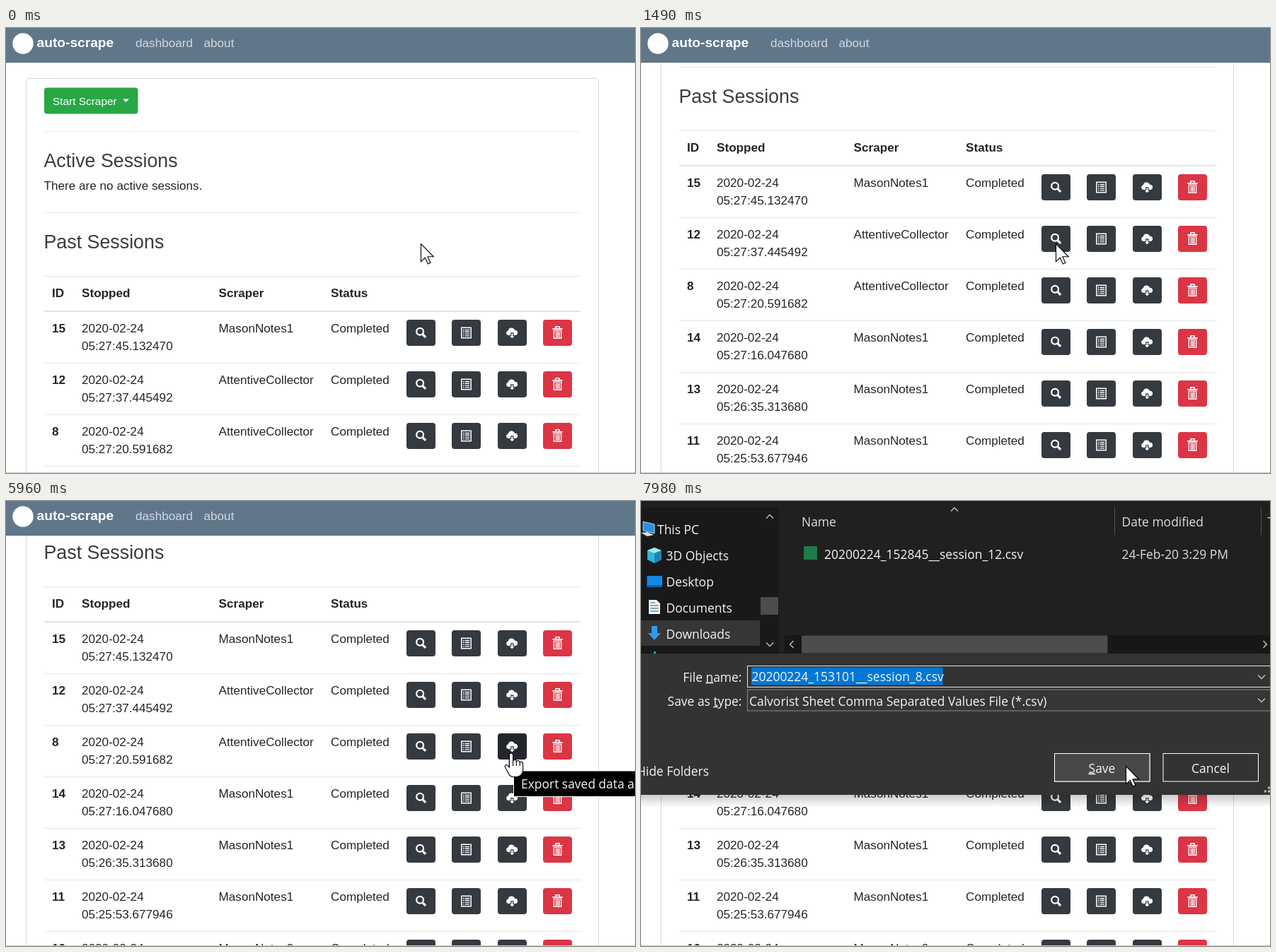
Recreate the animation shown at these times as an HTML page. Size 889 px wide and 630 px high, loop 8000 ms.

```html
<!DOCTYPE html>
<html lang="en">
<head>
<meta charset="utf-8">
<title>Session list</title>
<style>
html, body { margin: 0; width: 100%; height: 100%; overflow: hidden; background: #fff; }
svg { display: block; width: 889px; height: 630px; }
text { font: 17.15px "Liberation Sans", Arial, sans-serif; fill: #212529; white-space: pre; }
.b { font-weight: 700; }
.h { font-size: 26.8px; fill: #3a3d40; }
.brand { font-size: 19.2px; font-weight: 700; fill: #fff; }
.link { fill: #d0d8de; }
.btn { font-size: 15.4px; fill: #fff; }
.ui { font: 17.45px "Open Sans", "Noto Sans", sans-serif; fill: #f4f4f4; }
.dim { fill: #dcdcdc; }
.end { text-anchor: end; }
.mid { text-anchor: middle; }
.u { text-decoration: underline; }
</style>
</head>
<body>
<svg id="stage" viewBox="0 0 889 630"></svg>
<script>
const LOOP = 8000, ROW = 73, COLS = [566, 630, 695, 759];

const text = (x, y, s, c = '') => `<text x="${x}" y="${y}" class="${c}">${s}</text>`;
const rect = (x, y, w, h, fill, more = '') =>
  `<rect x="${x}" y="${y}" width="${w}" height="${h}" fill="${fill}" ${more}/>`;
const path = (d, stroke, w = 1, fill = 'none') =>
  `<path d="${d}" fill="${fill}" stroke="${stroke}" stroke-width="${w}"/>`;
const rule = (y, color = '#e3e6e9', h = 1) => rect(54, y, 758, h, color);
// Shown only while from <= time < to
const during = (from, to, s) => `<g data-from="${from}" data-to="${to}">${s}</g>`;

// Button icons, drawn around their centre
const icons = [
  '<circle cx="-1.4" cy="-1.8" r="4.9" fill="none" stroke="#fff" stroke-width="2.3"/>' +
    path('M2.3 2.1L6.6 6.4', '#fff', 3.2),
  path('M-6.7-7.2H6.7V7.2H-6.7Z', '#fff', 1.5) +
    path('M-4.6-4H-3M-1.8-4H4.6M-4.6-1.2H-3M-1.8-1.2H4.6M-4.6 1.6H-3M-1.8 1.6H4.6M-4.6 4.4H-3M-1.8 4.4H4.6', '#fff', 1.4),
  path('M-5.2 3.5A3.3 3.3 0 0 1-5.8-3Q-4.8-7.4-.8-7Q2.4-6.8 3.4-3.8A3.7 3.7 0 0 1 4.6 3.5Z', 'none', 0, '#fff') +
    path('M-1.8 .4H1.4V4H4.4L-.2 9-4.8 4H-1.8Z', '#30363c', 1.2, '#fff'),
  path('M-7.2-5.6H7.2M-2.6-6V-8.8H2.6V-6', '#fff', 1.6) +
    path('M-5.2-3.4H5.2V7.8H-5.2ZM-2-2V6.5M.2-2V6.5M2.4-2V6.5', '#fff', 1.4)
];

function row([id, time, name], i) {
  const y = 401 + ROW * i;
  const buttons = COLS.map((x, k) =>
    rect(x, y + 12, 41, 37, k < 3 ? '#343a40' : '#dc3545', `rx="4" data-btn="${i},${k}"`) +
    `<g transform="translate(${x + 20.5} ${y + 30.5})">${icons[k]}</g>`).join('');
  return text(65, y + 30, id, 'b') + text(107, y + 30, '2020-02-24') + text(107, y + 55, time) +
    text(300.5, y + 30, name) + text(459, y + 30, 'Completed') + buttons + rule(y + ROW);
}

const rows = [
  [15, '05:27:45.132470', 'MasonNotes1'],
  [12, '05:27:37.445492', 'AttentiveCollector'],
  [8, '05:27:20.591682', 'AttentiveCollector'],
  [14, '05:27:16.047680', 'MasonNotes1'],
  [13, '05:26:35.313680', 'MasonNotes1'],
  [11, '05:25:53.677946', 'MasonNotes1'],
  [10, '05:25:20.310528', 'MasonNotes2']
];

const page = rect(28.5, 71.5, 809, 900, '#fff', 'rx="4" stroke="#d6d6d6"') +
  rect(54, 84.5, 132.5, 37, '#28a745', 'rx="4"') + text(66, 108.5, 'Start Scraper', 'btn') +
  path('M165 100.5H174L169.5 105Z', 'none', 0, '#fff') +
  rule(146, '#ececec') + text(53.5, 196.5, 'Active Sessions', 'h') +
  text(53.5, 229, 'There are no active sessions.') +
  rule(261, '#e6e6e6') + text(53.5, 311.5, 'Past Sessions', 'h') + rule(351) +
  text(65, 381, 'ID', 'b') + text(107, 381, 'Stopped', 'b') +
  text(300.5, 381, 'Scraper', 'b') + text(459, 381, 'Status', 'b') +
  rule(400, '#dee2e6', 2) + rows.map(row).join('');

const navbar = rect(0, 0, 889, 49, '#60778a') + rect(0, 48, 889, 1, '#546a7c') +
  '<circle cx="24" cy="22" r="14.7" fill="#fff"/>' +
  text(43.5, 27, 'auto-scrape', 'brand') + text(183, 27, 'dashboard', 'link') + text(279.5, 27, 'about', 'link');

const tip = (x, y, w, s) =>
  rect(x + .5, y + .5, w - 1, 36.5, '#000', 'stroke="#fff"') + text(x + 11, y + 25.5, s, 'ui');

const tips = during(2590, 3390, tip(606, 383, 158, 'View session log')) +
  during(4050, 4850, tip(657, 373, 172, 'View scraped data')) +
  during(5960, 6760, tip(717, 381.5, 240, 'Export saved data as CSV'));

// Save dialog
const monitor = y => path(`M3 ${y - 11}L19 ${y - 7}V${y + 6}L3 ${y + 2}Z`, '#9fd4f5', 1, '#2c8fe0') +
  path(`M0 ${y + 5}L9 ${y + 4}L18 ${y + 8}L9 ${y + 10}Z`, 'none', 0, '#d5dde3');
const chevron = (x, y, d) => path({
  up: `M${x - 5} ${y + 2.5}l5-5 5 5`, down: `M${x - 5} ${y - 2.5}l5 5 5-5`,
  left: `M${x + 2.5} ${y - 5}l-5 5 5 5`, right: `M${x - 2.5} ${y - 5}l5 5-5 5`
}[d], '#c4c4c4', 1.4);

const quickNav = rect(0, 181, 168, 35, '#333') + rect(170, 36, 24, 116, '#5a5a5a') +
  ['Quick access', 'Stowbin', 'OwnShelf', 'This PC'].map((s, i) => text(24, 59 + 49 * i, s, 'ui')).join('') +
  monitor(199);

const pcNav = rect(0, 169, 168, 36, '#363636') + rect(169, 136, 25, 25, '#4d4d4d') +
  text(23, 46.5, 'This PC', 'ui') +
  ['3D Objects', 'Desktop', 'Documents', 'Downloads'].map((s, i) => text(35.5, 83.5 + 37 * i, s, 'ui')).join('') +
  monitor(40) +
  path('M19 66L29 70V83L19 88L9 83V70Z', 'none', 0, '#35b4d6') +
  path('M19 66L29 70L19 74L9 70Z', 'none', 0, '#a5e6f3') + path('M19 74L29 70V83L19 88Z', 'none', 0, '#1d86b5') +
  rect(8.5, 106, 21.5, 16, '#1487e0') + rect(8.5, 119, 21.5, 3, '#0a62b0') +
  path('M11 140H22L27 145V160H11Z', 'none', 0, '#f2f4f5') +
  path('M13.5 144H20M13.5 148H24.5M13.5 152H24.5M13.5 156H24.5', '#5f8fae', 1.3) +
  path('M15 177H23V187H28L19 197L10 187H15Z', 'none', 0, '#2e9bee') + rect(18, 213, 3, 3, '#1fa3c8');

const saveBox = fill => rect(584.5, 357.5, 134.5, 39.5, fill, 'stroke="#fff"');

const form = rect(0, 216, 889, 200, '#333') +
  text(142.5, 255.5, 'File <tspan class="u">n</tspan>ame:', 'ui end') +
  text(142.5, 289.5, 'Save as <tspan class="u">t</tspan>ype:', 'ui end') +
  rect(150.5, 233.5, 760, 30, '#333', 'stroke="#e8e8e8"') + rect(156, 235.5, 270.5, 25, '#0078d7') +
  text(156.5, 255, '20200224_153101__session_8.csv', 'ui') +
  rect(150.5, 267, 760, 30, '#363636', 'stroke="#8a8a8a"') +
  text(153, 289.5, 'Calvorist Sheet Comma Separated Values File (*.csv)', 'ui') +
  chevron(877, 249, 'down') + chevron(877, 282, 'down') +
  text(96, 388.5, 'Hide Folders', 'ui end') +
  saveBox('#333') + during(7850, LOOP, saveBox('#484848')) +
  rect(738, 357.5, 134.5, 39.5, '#333', 'stroke="#fff"') +
  text(651.5, 384.5, '<tspan class="u">S</tspan>ave', 'ui mid') + text(805, 384.5, 'Cancel', 'ui mid') +
  path('M886 406h3M881 411h3M886 411h3', '#bbb', 3);

const unpainted = rect(0, 364, 100, 32, '#fff') + rect(583.5, 356.5, 135.5, 40, '#fff') +
  rect(737, 356.5, 134.5, 40, '#fff') + rect(870, 389, 19, 26, '#fff');

const dialog = rect(0, 416, 889, 18, 'url(#shade)') + rect(0, 0, 889, 416, '#202020') +
  during(0, 7510, rect(0, 0, 889, 316, '#fff')) +
  rect(0, 9, 195, 207, '#191919') + rect(201, 9, 688, 207, '#202020') + rect(0, 316, 889, 100, '#333') +
  during(0, 7620, quickNav) + during(7620, LOOP, pcNav) +
  chevron(182, 22, 'up') + chevron(182, 203, 'down') +
  text(227, 36, 'Name', 'ui dim') + text(679.5, 36, 'Date modified', 'ui dim') + text(885.5, 36, 'Type', 'ui dim') +
  chevron(443, 12, 'up') + rect(669, 9, 1, 39, '#555') + rect(876, 9, 1, 39, '#555') +
  rect(203, 190, 686, 26, '#171717') + rect(227, 190.5, 432.5, 25, '#4d4d4d') +
  chevron(213, 203, 'left') + chevron(882, 203, 'right') +
  during(0, 7740, text(548.5, 91.5, 'Working on it...', 'ui mid')) +
  during(7740, LOOP, rect(230, 64, 19, 19, '#1d7c48') +
    text(259, 82, '20200224_152845__session_12.csv', 'ui') + text(679.5, 82, '24-Feb-20 3:29 PM', 'ui dim')) +
  during(0, 7510, unpainted) + during(7510, LOOP, form);

const arrow = path('M.5 .5V25.8L6.3 20.3L10.3 29L13.9 27.4L10 18.8H18.3Z', '#000', 1.1, '#fff');
const hand = path('M-2.6 3Q-2.6 .5 0 .5T2.6 3V12Q2.8 9.6 5 9.6T7.4 12.5V13.2Q7.6 11 9.8 11T12.2 14V14.8Q12.4 12.8 14.4 12.8T16.6 15.6V24Q16.4 33.5 7 34H3Q-2 34-4.5 28L-8.5 20.5Q-9.2 17.5-7 17Q-4.8 17-2.6 20.5Z', '#000', 1.1, '#fff') +
  path('M-2.6 20V3M2.6 11V18.5M7.4 12.5V18.5M12.2 14V18.5', '#000', 1.1);

const stage = document.getElementById('stage');
stage.innerHTML = '<defs><linearGradient id="shade" x2="0" y2="1"><stop stop-opacity=".2"/>' +
  '<stop offset="1" stop-opacity="0"/></linearGradient></defs>' +
  rect(0, 0, 889, 630, '#fff') + `<g id="page">${page}</g>` + navbar + rect(0, 629, 889, 1, '#c9cbcd') +
  `<g id="dialog">${dialog}</g>${tips}<g id="cursor"><g id="arrow">${arrow}</g><g id="hand">${hand}</g></g>`;

// Step tables: [time, value...], each held until the next
const scrollSteps = [0, 10, 36, 70, 103, 133, 158, 177, 190, 199, 206, 213, 220, 226, 230]
  .map((y, i) => [i ? 390 + i * 110 : 0, y]);
const cursorSteps = [
  [0, 586, 305], [1830, 586, 312], [1940, 586, 321], [2090, 586, 334], [2190, 586, 346],
  [2290, 587, 355], [2390, 587, 361], [2490, 587, 363.5],
  [3390, 598, 362], [3500, 613, 358], [3600, 628, 355], [3710, 639, 354],
  [4850, 646, 354], [4960, 661, 355], [5070, 677, 356], [5190, 692, 357], [5300, 706, 358], [5410, 718, 359],
  [5740, 716, 358], [5850, 714, 356.5], [6980, 715, 356],
  [7740, 711, 361], [7850, 697, 369], [7980, 685, 375]
];
const dialogSteps = [[0, 0], [7080, .45], [7190, .93], [7290, 1]];

const at = (steps, t) => steps.reduce((held, s) => s[0] <= t + .5 ? s : held);
const el = id => document.getElementById(id);
const [pageEl, dialogEl, cursorEl, arrowEl, handEl] = ['page', 'dialog', 'cursor', 'arrow', 'hand'].map(el);
const show = (e, on) => e.style.display = on ? '' : 'none';
const timed = [...stage.querySelectorAll('[data-from]')];
const buttons = [...stage.querySelectorAll('[data-btn]')].map(e => {
  const [i, k] = e.dataset.btn.split(',').map(Number);
  return { e, x: COLS[k], y: 413 + ROW * i, base: k < 3 ? '#343a40' : '#dc3545', lit: k < 3 ? '#23272b' : '#c82333' };
});

function draw(t) {
  const [, scroll] = at(scrollSteps, t), [, x, y] = at(cursorSteps, t), [, alpha] = at(dialogSteps, t);
  let over = false;
  for (const b of buttons) {
    const top = b.y - scroll;
    const hit = t >= 2090 && t < 6980 && x >= b.x && x <= b.x + 41 && y >= top && y <= top + 37;
    b.e.setAttribute('fill', hit ? b.lit : b.base);
    over = over || hit;
  }
  pageEl.setAttribute('transform', `translate(0 ${-scroll})`);
  cursorEl.setAttribute('transform', `translate(${x} ${y})`);
  show(arrowEl, !over);
  show(handEl, over);
  show(dialogEl, alpha > 0);
  dialogEl.setAttribute('opacity', alpha);
  for (const e of timed) show(e, t >= +e.dataset.from && t < +e.dataset.to);
}

const start = performance.now();
function tick() {
  draw((performance.now() - start) % LOOP);
  requestAnimationFrame(tick);
}
tick();
</script>
</body>
</html>
```
